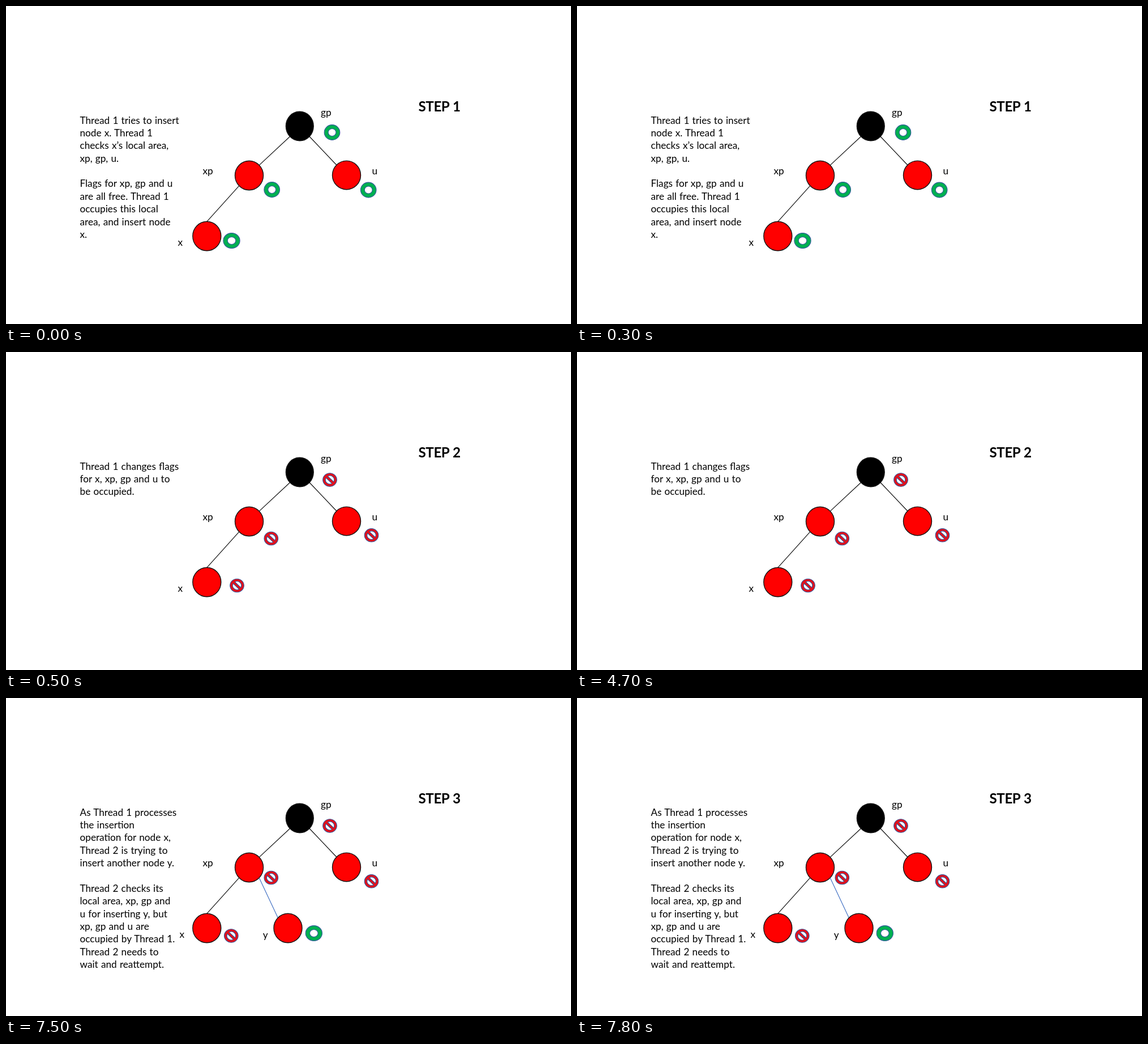
These frames come from a looping animation (998x561 px, 8 s). An HTML page:

```html
<!DOCTYPE html>
<html lang="en">
<head>
<meta charset="utf-8">
<title>Concurrent tree insertion</title>
<style>
  html, body { margin: 0; width: 100%; height: 100%; overflow: hidden; background: #fff; }
  svg { display: block; width: 998px; height: 561px; }
  text { font: 17.2px Lato, "Open Sans", sans-serif; word-spacing: .8px; }
  .title { font-size: 24.2px; font-weight: 700; letter-spacing: -.45px; }
  .edge { stroke: #111; stroke-width: 1.2; }
  .new { stroke: #4472c4; }
  .node { fill: #f00; stroke: #111; stroke-width: 1.4; }
  .root { fill: #000; }
  .flag { stroke: #34589c; stroke-width: 1.1; }
  .free { fill: #00b050; }
  .busy { fill: #e3101a; }
  .hole { fill: #fff; }
</style>
</head>
<body>
<svg id="stage" viewBox="0 0 998 561"></svg>
<script>
const NS = "http://www.w3.org/2000/svg";
const stage = document.getElementById("stage");
const LOOP = 8000, LINE = 22.37;

const nodes = {
  gp: { cx: 518.8, cy: 212, rx: 24.4, ry: 25.8, class: "node root" },
  xp: { cx: 429.5, cy: 299, rx: 25, ry: 25.7, class: "node" },
  u: { cx: 601.5, cy: 298.4, rx: 25, ry: 25.3, class: "node" },
  x: { cx: 354.8, cy: 406, rx: 25, ry: 25.7, class: "node" },
  y: { cx: 498, cy: 406, rx: 25, ry: 25.7, class: "node" }
};

function add(parent, tag, attrs, content) {
  const el = document.createElementNS(NS, tag);
  for (const key in attrs) el.setAttribute(key, attrs[key]);
  if (content) el.textContent = content;
  parent.appendChild(el);
  return el;
}
const label = (g, x, y, s, cls = "") => add(g, "text", { x, y, class: cls }, s);
const node = (g, name) => add(g, "ellipse", nodes[name]);

// Point on a node's rim, angle in degrees clockwise from the right
function rim(name, angle) {
  const { cx, cy, rx, ry } = nodes[name], a = angle * Math.PI / 180;
  return [cx + rx * Math.cos(a), cy + ry * Math.sin(a)];
}
function edge(g, from, fromAngle, to, toAngle, cls = "") {
  const [x1, y1] = rim(from, fromAngle), [x2, y2] = rim(to, toAngle);
  add(g, "line", { x1, y1, x2, y2, class: "edge " + cls });
}

function free(g, cx, cy, rx = 13.8) {
  add(g, "ellipse", { cx, cy, rx, ry: 13.4, class: "flag free" });
  add(g, "ellipse", { cx, cy, rx: rx / 2, ry: 6.5, class: "flag hole" });
}

function busy(g, x, y) {
  const sign = add(g, "g", { transform: `translate(${x} ${y}) scale(1 .95) rotate(45)` });
  add(sign, "circle", { r: 12.3, class: "flag busy" });
  const half = "M-7.3-2.2A7.6 7.6 0 0 1 7.3-2.2Z";
  add(sign, "path", { d: half, class: "flag hole" });
  add(sign, "path", { d: half, transform: "rotate(180)", class: "flag hole" });
}

// Parts shared by every step
edge(stage, "gp", 135, "xp", -45);
edge(stage, "gp", 45, "u", -135);
edge(stage, "xp", 135, "x", -90);
["gp", "xp", "u", "x"].forEach(name => node(stage, name));
label(stage, 556, 194, "gp");
label(stage, 347.5, 296.7, "xp");
label(stage, 646.5, 296.7, "u");

const steps = [
  {
    start: 0, x: 303.5,
    lines: ["Thread 1 tries to insert", "node x. Thread 1", "checks x’s local area,", "xp, gp, u.", "",
      "Flags for xp, gp and u", "are all free. Thread 1", "occupies this local", "area, and insert node", "x."],
    free: [[576, 223], [469.7, 324], [640.2, 324.5], [398.5, 414, 14.6]], busy: []
  },
  {
    start: 500, x: 303.5,
    lines: ["Thread 1 changes flags", "for x, xp, gp and u to", "be occupied."],
    free: [], busy: [[572, 225.5], [468.3, 329], [645.5, 323.3], [408, 412]]
  },
  {
    start: 7500, x: 306.5,
    lines: ["As Thread 1 processes", "the insertion", "operation for node x,", "Thread 2 is trying to",
      "insert another node y.", "", "Thread 2 checks its", "local area, xp, gp and", "u for inserting y, but",
      "xp, gp and u are", "occupied by Thread 1.", "Thread 2 needs to", "wait and reattempt."],
    free: [[543.8, 415, 14.6]], busy: [[572, 225.5], [468.3, 317], [645.5, 323.3], [397.8, 419.5]]
  }
];

steps.forEach((step, i) => {
  const g = step.group = add(stage, "g", {});
  label(g, 728.5, 185.7, "STEP " + (i + 1), "title");
  step.lines.forEach((s, n) => label(g, 130.5, 207.6 + n * LINE, s));
  label(g, step.x, 422.7, "x");
  if (i === 2) {
    edge(g, "xp", 45, "y", -135, "new");
    node(g, "y");
    label(g, 453.7, 424, "y");
  }
  step.free.forEach(p => free(g, ...p));
  step.busy.forEach(p => busy(g, ...p));
});

const origin = performance.now();
function draw(now) {
  const t = Math.max(0, now - origin) % LOOP;
  const current = steps.filter(s => s.start <= t).pop();
  for (const s of steps) s.group.style.display = s === current ? "" : "none";
  requestAnimationFrame(draw);
}
draw(origin);
</script>
</body>
</html>
```
